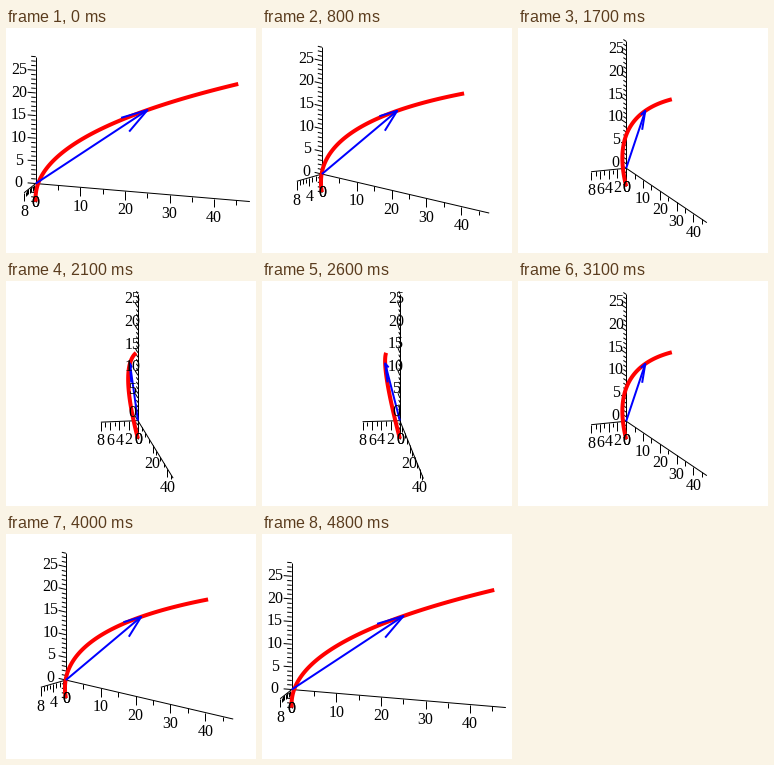
A matplotlib script that plays this animation: 250x225 px, repeating every 4.9 s.

```python
import numpy as np
import matplotlib.pyplot as plt
from matplotlib.animation import FuncAnimation
from matplotlib.collections import LineCollection

W, H, DPI = 250, 225, 100
PX = 72 / DPI
FRAMES, STEP_MS = 49, 100
CENTER = np.array([131.0, 114.8])
MID = np.array([24, 4, 12])
SCALE = 4.69
TILT = np.radians(75)

t = np.linspace(0, 4, 120)
CURVE = np.column_stack([3 * t**2, 2 * t, 8 * t - 4])

# Position vector with a flat two-stroke head in its vertical plane
TIP = np.array([27.0, 6.0, 20.0])
flat = np.hypot(TIP[0], TIP[1])
SIDE = 0.05 * np.array([TIP[2] * TIP[0] / flat, TIP[2] * TIP[1] / flat, -flat])
SHAFT = np.array([[0, 0, 0], TIP])
HEAD = np.array([0.8 * TIP - SIDE, TIP, 0.8 * TIP + SIDE])

fig = plt.figure(figsize=(W / DPI, H / DPI), dpi=DPI, facecolor="white")
ax = fig.add_axes([0, 0, 1, 1])


def basis(angle):
    """Screen vectors (y down) of the three unit axes."""
    s, c = np.sin(angle), np.cos(angle)
    k = np.cos(TILT)
    return SCALE * np.array([[s, k * c], [-c, k * s], [0, -np.sin(TILT)]])


def label_steps(axes):
    """Label spacing on x and y, widened as the axes foreshorten."""
    x_room = 48 * np.hypot(*axes[0])
    y_room = 8 * np.hypot(*axes[1])
    x_step = 10 if x_room > 87.5 else 20
    y_step = int(np.ceil(8 / min(4, max(1, y_room // 8.75))))
    return x_step, y_step


def draw_axis(origin, unit, span, minor, labels, offset):
    lo, hi = span
    segs = [[origin + lo * unit, origin + hi * unit]]
    first = int(np.ceil(lo / minor)) * minor
    for v in range(first, hi + 1, minor):
        p = origin + v * unit
        segs.append([p, p + offset * (0.48 if v in labels else 0.27)])
    ax.add_collection(LineCollection(segs, colors="black", linewidths=PX, zorder=1))
    for v in labels:
        x, y = origin + v * unit + offset
        ax.text(x, y + 5.3, str(v), size=16 * PX, family="Liberation Serif",
                ha="center", va="baseline", color="black", zorder=4)


def draw(i):
    ax.clear()
    ax.set(xlim=(0, W), ylim=(H, 0))
    ax.axis("off")

    pose = min(i, FRAMES - 1 - i)
    axes = basis(np.radians(72 - 3 * pose))
    origin = CENTER - MID @ axes
    x_step, y_step = label_steps(axes)

    down = np.array([0, 18.0])
    reach = np.hypot(*axes[0])
    back = -axes[0] / reach * 9.6 * reach**0.38
    y_labels = sorted({*range(0, 9, y_step), 8})

    draw_axis(origin, axes[0], (0, 48), 5, range(0, 49, x_step), down)
    draw_axis(origin, axes[1], (0, 8), 1, y_labels, down)
    draw_axis(origin, axes[2], (-4, 28), 1, range(0, 28, 5), back)

    for pts, color, width in ((CURVE, "red", 4), (SHAFT, "blue", 2), (HEAD, "blue", 2)):
        ax.plot(*(origin + pts @ axes).T, color=color, lw=width * PX,
                solid_capstyle="butt", solid_joinstyle="round", zorder=3)
    return []


anim = FuncAnimation(fig, draw, frames=FRAMES, interval=STEP_MS,
                     init_func=lambda: draw(0), repeat=True, repeat_delay=0)
plt.show()
```
